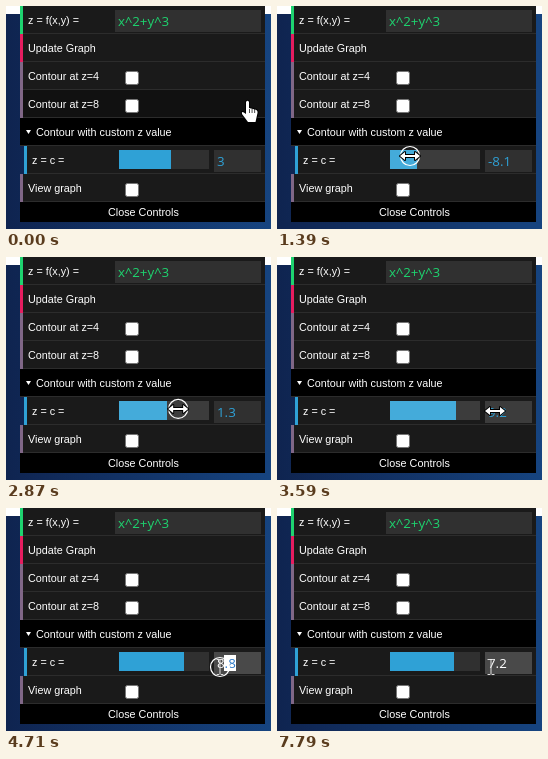
Animation of 265x223 px, one loop 8000 ms. Source, as an HTML page with a canvas:

```html
<!DOCTYPE html>
<html lang="en">
<head>
<meta charset="utf-8">
<title>Contour controls</title>
<style>
html, body { margin: 0; width: 100%; height: 100%; overflow: hidden; background: #10264f; }
canvas { display: block; }
</style>
</head>
<body>
<canvas id="stage" width="265" height="223"></canvas>
<script>
const ctx = document.getElementById('stage').getContext('2d');
const LOOP = 8000;
const LEFT = 14, WIDTH = 245, ROW = 28;
const BLUE = '#2fa1d6', GREEN = '#1ed36f', PINK = '#e61d5f', PURPLE = '#806787';
const FIELD = '#303030', HOVER = '#3c3c3c', FOCUS = '#494949';
const LABEL = '10.8px "Liberation Sans", Arial, sans-serif';
const INPUT = '13.33px "Open Sans", "Noto Sans", sans-serif';

// Moments in ms
const REACH = 1000, PRESS = 1240, SLIDE = 2180, RELEASE = 3400, LEAVE = 3700;
const SELECT = 4410, SELECTED = 4850, TYPE_7 = 6290, TYPE_DOT = 6840, TYPE_2 = 7790;

let now = 0;

// Smooth step from 0 to 1 between two moments
function ramp(start, end) {
  const u = Math.min(1, Math.max(0, (now - start) / (end - start)));
  return u * u * (3 - 2 * u);
}

function pointerPosition() {
  return {
    x: 242 - 109 * ramp(280, 1390) - 4 * ramp(1390, 1780) + 89 * ramp(SLIDE, 3590)
      + 18 * ramp(3590, 4130) - 22 * ramp(4130, 4710),
    y: 103 + 47 * ramp(280, 1100) + 4 * ramp(SLIDE, 3590) + 5 * ramp(4130, 4710)
  };
}

function sliderValue() {
  return 3 - 11.1 * ramp(1000, 1390) - 5.7 * ramp(1390, 1780)
    + 23 * ramp(SLIDE, 3320) - 0.8 * ramp(SELECT, 5010);
}

function rect(x, y, w, h, color) {
  ctx.fillStyle = color;
  ctx.fillRect(x, y, w, h);
}

function text(str, x, y, color = '#fff', font = LABEL) {
  ctx.font = font;
  ctx.fillStyle = color;
  ctx.fillText(str, x, y);
}

function shape(path, x, y, outline = 0) {
  const p = new Path2D(path);
  ctx.save();
  ctx.translate(x, y);
  ctx.lineJoin = 'round';
  ctx.lineWidth = outline;
  ctx.strokeStyle = '#000';
  if (outline) ctx.stroke(p);
  ctx.fillStyle = '#fff';
  ctx.fill(p);
  ctx.restore();
}

function backdrop() {
  const g = ctx.createLinearGradient(0, 0, 265, 0);
  g.addColorStop(0, '#0f2450');
  g.addColorStop(1, '#164480');
  rect(0, 0, 265, 223, g);
  rect(0, 0, 265, 8, '#fff');
}

function row(index, label, accent, pointerY, indent = 0) {
  const y = index * ROW, x = LEFT + indent;
  const hovered = accent !== BLUE && pointerY >= y && pointerY < y + ROW;
  rect(x, y, WIDTH - indent, ROW - 1, hovered ? '#111' : '#1a1a1a');
  rect(x, y + ROW - 1, WIDTH - indent, 1, '#2c2c2c');
  rect(x, y, 3, ROW, accent);
  text(label, x + 8, y + 18);
  if (accent === PURPLE) checkbox(119.5, y + 9.5);
}

function checkbox(x, y) {
  ctx.beginPath();
  ctx.roundRect(x, y, 13, 13, 2);
  ctx.fillStyle = '#fff';
  ctx.fill();
  ctx.strokeStyle = '#767676';
  ctx.lineWidth = 1;
  ctx.stroke();
}

function bar(y, height) {
  rect(LEFT, y, WIDTH, height, '#000');
}

function panel(pointerY) {
  row(0, 'z = f(x,y) =', GREEN, pointerY);
  rect(109, 4, 146, 22, FIELD);
  text('x^2+y^3', 112, 20, GREEN, INPUT);
  row(1, 'Update Graph', PINK, pointerY);
  row(2, 'Contour at z=4', PURPLE, pointerY);
  row(3, 'Contour at z=8', PURPLE, pointerY);
  bar(4 * ROW, ROW - 1);
  rect(LEFT, 5 * ROW - 1, WIDTH, 1, '#2c2c2c');
  shape('M0 0H5L2.5 4Z', 20, 124);
  text('Contour with custom z value', 30, 130);
  row(5, 'z = c =', BLUE, pointerY, 4);
  row(6, 'View graph', PURPLE, pointerY);
  bar(7 * ROW, 20);
  text('Close Controls', 102, 210);
}

function slider(value) {
  const hovered = now >= REACH && now < LEAVE;
  rect(113, 144, 90, 19, hovered ? HOVER : FIELD);
  rect(113, 144, Math.round(90 * (value + 20) / 40), 19, hovered ? '#44abda' : BLUE);
}

function numberField(value) {
  const focused = now >= SELECT;
  rect(208, 144, 47, 22, focused ? FOCUS : now >= 3590 ? HOVER : FIELD);
  if (now >= TYPE_7) return typing();
  const str = String(Math.round(value * 10) / 10);
  text(str, 211, 160, focused ? '#fff' : BLUE, INPUT);
  if (now >= SELECT + 150) selection(str, now < SELECTED ? 218 : 211);
}

function selection(str, from) {
  ctx.save();
  ctx.beginPath();
  ctx.rect(from, 147, 230 - from, 16);
  ctx.clip();
  rect(from, 147, 19, 16, '#fff');
  text(str, 211, 160, '#2878c8', INPUT);
  ctx.restore();
}

function typing() {
  const typed = now < TYPE_DOT ? '7' : now < TYPE_2 ? '7.' : '7.2';
  const sinceKey = now - (now < TYPE_DOT ? TYPE_7 : TYPE_DOT);
  text(typed, 211, 160, '#fff', INPUT);
  if (now < TYPE_2 && sinceKey % 830 < 420) {
    rect(Math.round(210 + ctx.measureText(typed).width), 147, 1, 16, '#fff');
  }
}

function hand(x, y) {
  shape('M5 14V2Q6.5-.5 8 2V8L14 9.5Q17 10 16.5 13L14.5 22H7L1 14Q0 10 5 14Z', x - 7, y - 9, 2);
  for (let i = 0; i < 3; i++) rect(x + 1 + 2.7 * i, y, 0.7, 4, '#000');
}

function resizeArrow(x, y) {
  shape('M-10 0L-5-4V-1H5V-4L10 0L5 4V1H-5V4Z', x, y, 2);
}

function textCursor(x, y) {
  rect(x - 0.5, y - 7, 1, 14, '#ddd');
  for (const dy of [-8, 7]) {
    rect(x - 3.5, y + dy, 3, 1, '#ddd');
    rect(x + 0.5, y + dy, 3, 1, '#ddd');
  }
}

function pointer({ x, y }) {
  const pressed = (now >= PRESS && now < RELEASE) || (now >= SELECT && now < SELECTED + 50);
  if (pressed) {
    ctx.beginPath();
    ctx.arc(x, y, 9.5, 0, Math.PI * 2);
    ctx.strokeStyle = '#fff';
    ctx.lineWidth = 1.2;
    ctx.stroke();
  }
  const cursor = now < REACH ? hand : now < LEAVE ? resizeArrow : textCursor;
  cursor(x, y);
}

function tick() {
  now = performance.now() % LOOP;
  const position = pointerPosition();
  const value = sliderValue();
  backdrop();
  panel(position.y);
  slider(value);
  numberField(value);
  pointer(position);
  requestAnimationFrame(tick);
}
tick();
</script>
</body>
</html>
```
